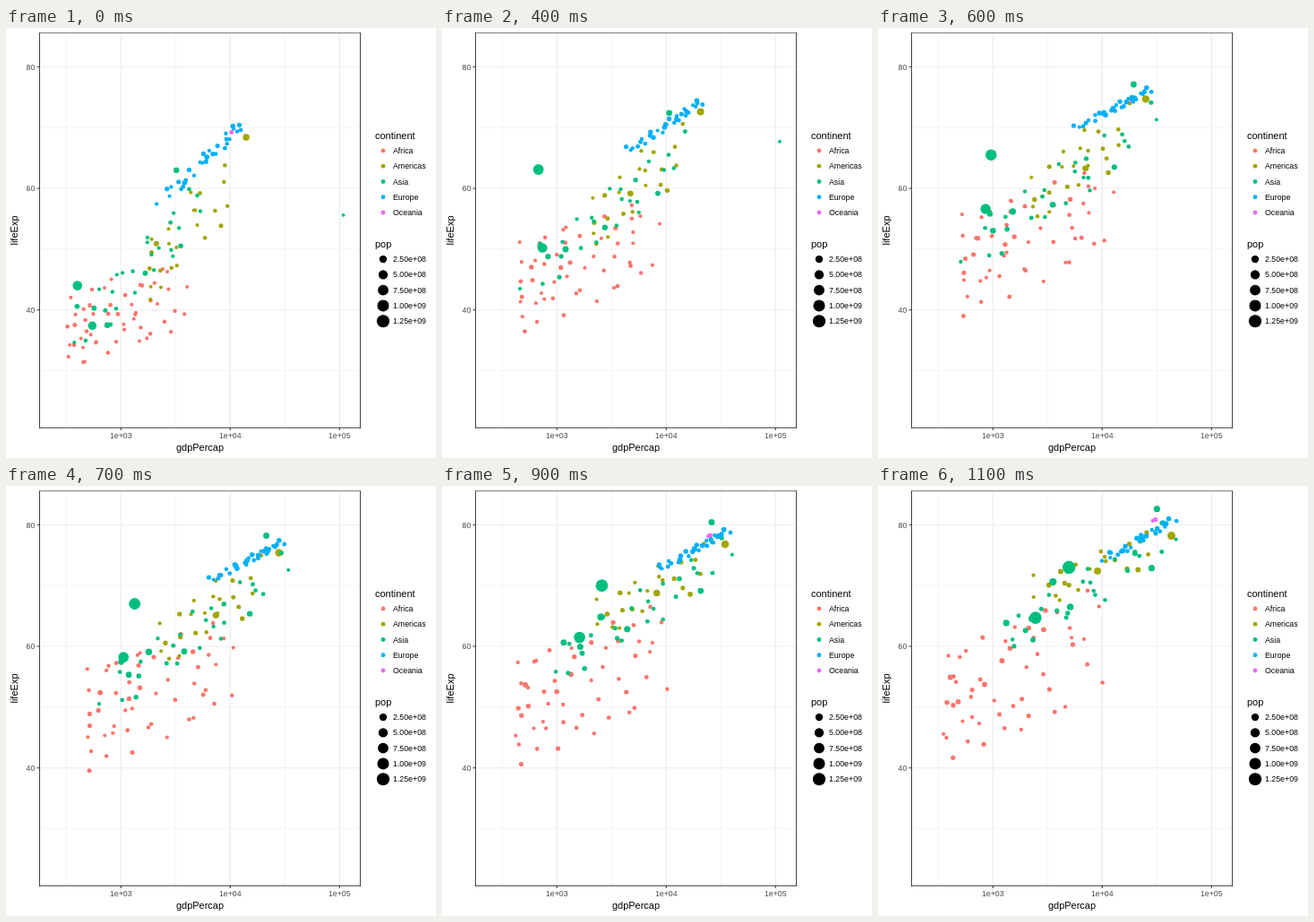
An HTML page for the animation above (1200 ms loop, 480 by 480 pixels).

```html
<!DOCTYPE html>
<html lang="en">
<head>
<meta charset="utf-8">
<title>Life expectancy and income</title>
<style>
  html, body { margin: 0; width: 100%; height: 100%; overflow: hidden; background: #fff; }
  svg { display: block; width: 100%; height: 100%; }
  text { font-family: "Liberation Sans", Arial, sans-serif; }
  .title { font-size: 11px; }
  .label { font-size: 8.8px; }
  .axis { font-size: 8.8px; fill: #4d4d4d; }
  .mid { text-anchor: middle; }
  .end { text-anchor: end; }
</style>
</head>
<body>
<svg id="chart" viewBox="0 0 480 480"></svg>
<script>
const STEP = 100, COUNT = 12;
const KEYS = { 3: [0, 6, 11], 5: [0, 2, 4, 6, 11] };

// A crowd spreads over one box per key step: poorest and richest gdp, lowest and highest life.
// skew pulls dots to the poor (> 1) or rich (< 1) side, tilt ties life to wealth.
// Giants are the few dots large or remote enough to follow on their own: gdp and life per key.
const regions = [
  { name: "Africa", color: "#F8766D",
    crowd: { n: 52, pop: [4, 14], skew: 1.4, tilt: .35,
      boxes: [[300, 4800, 29, 50], [430, 16000, 38, 67], [300, 13200, 39, 73]] } },
  { name: "Americas", color: "#A3A500",
    crowd: { n: 23, pop: [4, 13], skew: 1.2, tilt: .55,
      boxes: [[1500, 11500, 38, 69], [2000, 23000, 52, 77], [2200, 36000, 65, 81]] },
    giants: [
      { pop: [158, 301], path: [[13990, 68.4], [25010, 74.7], [42952, 78.2]] },
      { pop: [57, 190], path: [[2109, 50.9], [7031, 63.3], [9066, 72.4]] }
    ] },
  { name: "Asia", color: "#00BF7D",
    crowd: { n: 28, pop: [9, 32], skew: 1, tilt: .7,
      boxes: [[330, 6500, 30, 64], [430, 30000, 43, 76], [950, 47000, 56, 82]] },
    giants: [
      { pop: [.2, 2.5],
        path: [[108382, 55.6], [95458, 60.5], [109348, 67.7], [31354, 71.3], [47307, 77.6]] },
      { pop: [86, 127], path: [[3217, 63], [19384, 77.1], [31656, 82.6]] },
      { pop: [82, 224], path: [[750, 37.5], [1517, 56.2], [3541, 70.6]] },
      { pop: [372, 1110], path: [[547, 37.4], [856, 56.6], [2452, 64.7]] },
      { pop: [556, 1319],
        path: [[400, 44], [488, 44.5], [677, 63.1], [962, 65.5], [4959, 73]] }
    ] },
  { name: "Oceania", color: "#E76BF3",
    crowd: { n: 2, pop: [4, 10], skew: 1, tilt: 1,
      boxes: [[10600, 10000, 69.4, 69.1], [17600, 19500, 73.8, 74.7], [25000, 34500, 80.2, 81.2]] } },
  { name: "Europe", color: "#00B0F6",
    crowd: { n: 30, pop: [10, 13], skew: .6, tilt: .85,
      boxes: [[1300, 14700, 52, 73], [3600, 28400, 67.5, 77], [6000, 49000, 71, 82]] } }
];

const chart = document.getElementById("chart");
const mix = (a, b, t) => a + (b - a) * t;
const xOf = logGdp => 128.3 + 122 * (logGdp - 3);
const yOf = life => 43.3 + 6.785 * (80 - life);
const radius = pop => 1.89 + 5.34 * Math.sqrt(pop / 1319);

function add(tag, attrs, text) {
  const el = document.createElementNS("http://www.w3.org/2000/svg", tag);
  for (const key in attrs) el.setAttribute(key, attrs[key]);
  if (text) el.textContent = text;
  return chart.appendChild(el);
}
const line = (x1, y1, x2, y2, stroke, width = 1.07) =>
  add("line", { x1, y1, x2, y2, stroke, "stroke-width": width });
const write = (x, y, cls, text) => add("text", { x, y, class: cls }, text);
const dot = (cx, cy, r, fill) => add("circle", { cx, cy, r, fill });

function random(seed) {
  return () => (seed = seed * 16807 % 2147483647) / 2147483647;
}

function makeCrowd({ n, pop, skew, tilt, boxes }, seed) {
  const rand = random(seed);
  return Array.from({ length: n }, (_, k) => {
    const size = 10 ** mix(-.8, .7, rand());
    const wealth = (k + rand()) / n, health = (k * .618 + .3) % 1;
    const path = boxes.map(([poor, rich, low, high]) => {
      const across = mix(wealth, rand(), .15) ** skew;
      const up = mix(mix(health, rand(), .15), across, tilt);
      return [poor * (rich / poor) ** across, mix(low, high, up)];
    });
    return { pop: pop.map(p => p * size), path };
  });
}

function makeDots() {
  return regions.flatMap(({ color, crowd, giants = [] }, k) =>
    [...makeCrowd(crowd, 4711 + 97 * k), ...giants].map(({ pop, path }) => ({
      el: dot(0, 0, 2, color),
      pop,
      path: path.map(([gdp, life]) => [xOf(Math.log10(gdp)), yOf(life)])
    })));
}

function placeAt(path, i) {
  const steps = KEYS[path.length];
  const k = Math.max(1, steps.findIndex(s => s >= i));
  const t = (i - steps[k - 1]) / (steps[k] - steps[k - 1]);
  return path[k].map((end, axis) => mix(path[k - 1][axis], end, t));
}

function drawPanel() {
  const grid = (logs, lives, width) => {
    for (const v of logs) line(xOf(v), 6, xOf(v), 446, "#ebebeb", width);
    for (const v of lives) line(38, yOf(v), 395, yOf(v), "#ebebeb", width);
  };
  grid([2.5, 3.5, 4.5], [30, 50, 70], .53);
  grid([3, 4, 5], [40, 60, 80], 1.07);
}

function drawFrame() {
  line(37, 5.5, 396, 5.5, "#7f7f7f", 1);
  line(37.5, 5, 37.5, 447, "#444", 1);
  line(395.5, 5, 395.5, 447, "#444", 1);
  line(37, 446.2, 396, 446.2, "#333", 1);
  for (const v of [40, 60, 80]) {
    line(34.6, yOf(v), 37.3, yOf(v), "#333");
    write(32.4, yOf(v) + 3.2, "axis end", String(v));
  }
  for (const v of [3, 4, 5]) {
    line(xOf(v), 446.3, xOf(v), 449, "#333");
    write(xOf(v), 458, "axis mid", "1e+0" + v);
  }
  write(216.5, 472, "title mid", "gdpPercap");
  add("text", { class: "title mid", transform: "translate(13 226) rotate(-90)" }, "lifeExp");
}

function drawLegend() {
  const list = (y0, title, entries) => {
    write(412, y0 - 13, "title", title);
    entries.forEach(([text, r, color], k) => {
      const y = y0 + 17.28 * k;
      dot(421, y, r, color);
      write(432, y + 3.1, "label", text);
    });
  };
  const byName = [...regions].sort((a, b) => a.name < b.name ? -1 : 1);
  list(136.9, "continent", byName.map(({ name, color }) => [name, 2.43, color]));
  list(258.1, "pop", ["2.50e+08", "5.00e+08", "7.50e+08", "1.00e+09", "1.25e+09"]
    .map(text => [text, radius(text / 1e6), "#000"]));
}

drawPanel();
const dots = makeDots();
drawFrame();
drawLegend();

function show(i) {
  for (const { el, pop, path } of dots) {
    const [x, y] = placeAt(path, i);
    el.setAttribute("cx", x.toFixed(2));
    el.setAttribute("cy", y.toFixed(2));
    el.setAttribute("r", radius(pop[0] * (pop[1] / pop[0]) ** (i / (COUNT - 1))).toFixed(2));
  }
}

const start = performance.now();
let shown = -1;
function tick() {
  const i = Math.floor((performance.now() - start) / STEP) % COUNT;
  if (i !== shown) show(shown = i);
  requestAnimationFrame(tick);
}
tick();
</script>
</body>
</html>
```
